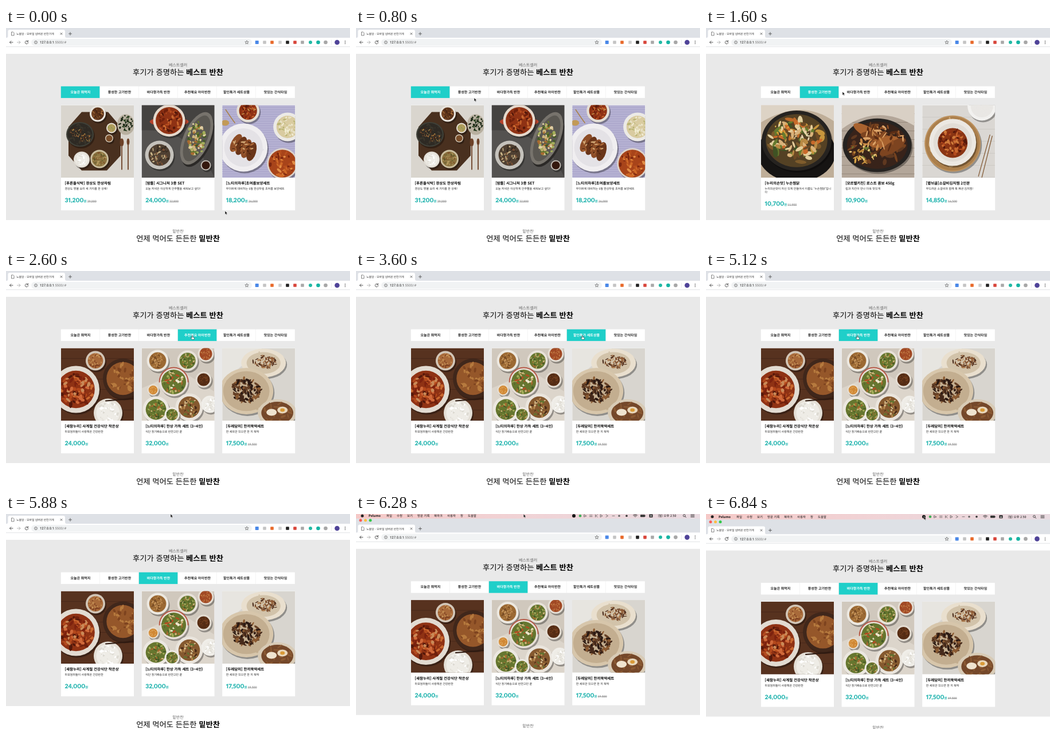
Write an HTML page that moves like this. It is 600x375 px and loops after 6880 ms.

```html
<!DOCTYPE html>
<html lang="ko">
<head>
<meta charset="utf-8">
<title>반찬가게</title>
<style>
html, body { margin: 0; width: 100%; height: 100%; overflow: hidden; background: #fff; }
svg { display: block; width: 600px; height: 375px; text-rendering: geometricPrecision; font-family: "Noto Sans CJK KR", "Noto Sans CJK", sans-serif; }
.price { font: 900 10.4px Lato, sans-serif; font-variant-numeric: proportional-nums; fill: #25b5b0; }
.won { font: 700 5.4px "Noto Sans CJK KR", sans-serif; }
.old { font: 400 5.1px Lato, sans-serif; fill: #666; text-decoration: line-through; }
</style>
</head>
<body>
<svg id="stage" viewBox="0 0 600 375"></svg>
<script>
const LOOP = 6880;
let seed = 7;
const rnd = () => (seed = (seed * 16807) % 2147483647) / 2147483647;

// Drawing helpers, all returning SVG markup
const rect = (x, y, w, h, fill, r = 0) => `<rect x="${x}" y="${y}" width="${w}" height="${h}" rx="${r}" fill="${fill}"/>`;
const oval = (x, y, rx, ry, fill, turn = 0) =>
  `<ellipse rx="${rx.toFixed(1)}" ry="${ry.toFixed(1)}" fill="${fill}" transform="translate(${x.toFixed(1)} ${y.toFixed(1)}) rotate(${turn | 0})"/>`;
const dot = (x, y, r, fill) => oval(x, y, r, r, fill);
const line = (d, color, w = 1) => `<path d="${d}" fill="none" stroke="${color}" stroke-width="${w}" stroke-linecap="round"/>`;
const shape = (d, fill) => `<path d="${d}" fill="${fill}"/>`;
const text = (x, y, s, size, fill = '#222', weight = 400, more = '') =>
  `<text x="${x}" y="${y}" font-size="${size}" fill="${fill}" font-weight="${weight}" ${more}>${s}</text>`;
const mid = 'text-anchor="middle"';

// Scattered pieces of food in an ellipse
function food(x, y, rx, ry, colors, n = 56) {
  const c = colors.split(' ');
  let s = '';
  for (let i = 0; i < n; i++) {
    const a = rnd() * 6.283, d = Math.sqrt(rnd()) * .88;
    s += oval(x + Math.cos(a) * d * rx, y + Math.sin(a) * d * ry, rx * (.07 + .13 * rnd()), ry * (.04 + .06 * rnd()), c[i % c.length], rnd() * 180);
  }
  return s;
}
function dish(x, y, r, rim, colors, fill = .78, k = 1) {
  const q = r * fill;
  return oval(x + 2, y + 3, r, r * k, '#0005') + oval(x, y, r, r * k, rim) +
    oval(x, y, q, q * k, colors.split(' ')[0]) + food(x, y, q, q * k, colors);
}
const planks = (color, step) => {
  let s = '';
  for (let y = step; y < 127; y += step) s += line(`M0 ${y}H127`, color, .6);
  return s;
};
const RED = '#8f3214 #b24a1e #6f200c #c9682f #55180a';
const BROWN = '#5c331a #85502a #3f2314 #a9713c';
const RICE = '#eeece6 #fff #dedbd3';
const GREEN = '#66762f #a3ad5a #cdb47c #435a26 #a86b30';

const photos = [
  [
    rect(0, 0, 127, 127, '#d9d5ce') +
      shape('M36 12H82L104 38V88L80 114H36L13 88V38Z', '#49301f') +
      dish(64, 15, 14, '#e9e5de', BROWN) + dish(33, 51, 24, '#3f4038', '#2e2a24 #3a352b', .9, .9) +
      food(26, 48, 13, 9, BROWN + ' #b9954e', 30) + food(42, 58, 12, 9, BROWN + ' #b9954e', 30) +
      dish(88, 40, 9, '#e6e1d6', '#b69d60 #8a9a50') + dish(84, 58, 7, '#d5cab8', '#7b4e2a') +
      dish(67, 94, 16, '#cbbf9f', '#8c7440 #b79d62 #5e5a2c #7b4c24', .82) +
      dish(36, 95, 14, '#e4e0d8', RICE) + oval(113, 34, 15, 18, '#b8b0a0') + food(113, 33, 14, 17, '#1c2a17 #2f4724 #16220f', 44) +
      line('M106 68V112M117 62V112', '#6d4128', 1.8) + oval(106, 65, 3.4, 7, '#6d4128') + oval(117, 64, 2.4, 6, '#6d4128'),
    rect(0, 0, 127, 127, '#545250') + shape('M0 0H127V127Q90 40 0 44Z', '#444240') +
      oval(48, 29, 34, 8, '#b5432c') + dish(48, 27, 28, '#e6d9cc', RED, .84) +
      oval(98, 62, 23, 49, '#2b2927', 24) + oval(96, 58, 23, 49, '#77736c', 24) + oval(96, 58, 18, 43, '#5b5852', 24) +
      food(95, 58, 17, 34, GREEN + ' #e0cfa4', 90) +
      dish(31, 87, 25, '#c5c2bc', '#4f4032 #382b20 #99805a #c9b488 #7a5034', .76) + dish(112, 105, 9, '#c0bbb3', '#35190e'),
    rect(0, 0, 127, 127, '#b5b1d2') + planks('#a29dc6', 4) +
      line('M6 8Q18 26 22 31', '#a9824a', 1.6) + oval(5, 31, 7, 5, '#c29a57') +
      dish(45, 10, 20, '#e5dfd5', RED + ' #c79a4e') + dish(114, 38, 25, '#eceae6', '#d9cba0 #f0ebcf #b9b473 #e6dfc4') +
      dish(37, 74, 42, '#f0eef0', '#e4e2e6', .8) +
      [0, 1, 2, 3].map(i => oval(24 + i * 9, 66 + i * 5, 8, 17, i % 2 ? '#6a3519' : '#8d4d27', 28 - i * 4)).join('') +
      food(37, 73, 23, 16, '#4a2210 #a96636 #d0a572', 26) +
      dish(105, 102, 27, '#ddd4cc', '#a8441a #d06a28 #7c260e #e28d45 #b8501e', .9)
  ],
  [
    rect(0, 0, 127, 127, '#bfae98') + shape('M0 0H127V28Q70 -12 0 30Z', '#ddd3c5') +
      oval(62, 82, 68, 52, '#161413') + dish(62, 62, 61, '#262320', '#544124 #c7953c #66772f #bd6a2a #e2cf9e #7f5c2c #3f5224', .88, .86) +
      food(62, 58, 44, 36, '#e5cd9a #b98a44 #d9b27a #667a2e #c96a2a #6d4a24', 60) +
      food(36, 42, 15, 13, '#dda233 #e9be4f', 14) + food(72, 48, 20, 16, '#ead8b4 #d8bb8c', 16),
    rect(0, 0, 127, 127, '#b3a699') + planks('#85776b', 15) + shape('M0 0H127V36Q60 -4 0 42Z', '#d9d0c5') +
      dish(62, 70, 60, '#262321', '#38231a #5f3820 #75421f', .88, .78) +
      food(38, 84, 28, 20, '#d9a64a #b98436 #ecc97c #6d7a34 #e0b868', 34) +
      [0, 1, 2, 3].map(i => oval(44 + i * 15, 46 + i * 9, 26, 9, i % 2 ? '#7d4420' : '#a8622f', 28 - i * 20)).join('') +
      food(70, 58, 42, 24, '#c98848 #5a2c14 #8e4e24 #dca368', 44),
    rect(0, 0, 127, 127, '#dad7d3') + planks('#c5c1bc', 21) +
      dish(104, 2, 25, '#f2f1ef', '#e9e7e4') + dish(53, 67, 49, '#bd925f', '#ab7f4c #cda571', .96) +
      dish(53, 65, 41, '#ece8e2', '#e2ddd6', .82) + dot(53, 66, 26, '#8a3514') + food(53, 65, 27, 25, RED + ' #cf7a3a', 84) +
      line('M118 52L98 124M122 54L104 126', '#8a6543', 1.4)
  ],
  [
    rect(0, 0, 127, 127, '#57321f') + planks('#3f2318', 18) +
      dish(60, 22, 17, '#d2c6b7', '#a86a3a #7c3f20 #cb9a5c') + dish(108, 53, 35, '#40271b', '#95572a #b67a3e #7d431f', .82) +
      dish(26, 72, 41, '#e2dbd1', RED, .8) + food(26, 70, 29, 29, '#b4481c #d0693a #7d220e #c98a58', 50) +
      dish(82, 113, 25, '#e4dfd6', RICE, .82) + line('M78 92L127 88', '#2e1a11', 2),
    rect(0, 0, 127, 127, '#d0c8bd') + shape('M0 70L70 40L127 76V127H0Z', '#dcd5cb') +
      dish(28, 22, 19, '#ece8e0', '#9c6a34 #c4935a #714622') + dish(80, 22, 18, '#e8e2d9', GREEN) +
      dish(112, 10, 14, '#e4ddd3', '#a04824 #c27a44') + dish(56, 59, 25, '#e8dfd7', GREEN + ' #b84a22 #f0e6cc', .86) +
      line('M31 59A25 25 0 0 1 81 59', '#b65a48', 2) + dish(108, 55, 14, '#e4ddd3', '#552c14 #75401f') +
      dish(20, 73, 10, '#e8e0d4', '#d08835 #dfa55a') + dish(25, 107, 23, '#ece8e1', GREEN) +
      dish(83, 103, 24, '#eae5dd', '#85592f #b98c52 #5f7430 #4c2c18 #d8bd8c') + dish(53, 116, 13, '#eeeae3', GREEN) +
      dish(119, 98, 15, '#f0eee9', RICE),
    rect(0, 0, 127, 127, '#d8d5cf') + shape('M0 0H70L0 60Z', '#e7e5e0') +
      dish(72, 26, 39, '#e9dfce', '#d2c3aa', .76, .64) + food(74, 24, 24, 13, '#6a4128 #8c5a36 #4b2c1c #a9784c', 56) +
      dish(42, 75, 47, '#d7c6ab', '#c3ae90', .86, .86) + food(41, 73, 29, 24, '#2c1b14 #45291a #643f25 #8b5a31', 100) +
      dish(96, 113, 34, '#d8cbb6', '#75482a #8b5a33', .82, .7) + oval(86, 112, 9, 6, '#efe3cf') + oval(105, 108, 9, 6, '#e9d8bc') +
      oval(105, 108, 4, 3, '#d99a38')
  ],
  [
    rect(0, 0, 127, 127, '#dedad0') + shape('M0 0H60L0 68Z', '#b7bd9a') + oval(66, 114, 56, 14, '#bdb5a8') +
      line('M103 62Q126 60 120 82Q115 96 97 92', '#6f8b97', 7) +
      shape('M14 56Q14 119 60 120Q106 119 106 56Z', '#7f9ba6') + shape('M20 94Q29 119 60 120Q91 119 100 94Z', '#d4cabb') +
      dish(60, 54, 46, '#a9bcc3', '#8a3a1c #b94f2a #d59a48 #c56c2e #dcbc7c', .86, .7) +
      food(70, 47, 25, 16, '#44642a #6a8c40 #2b461b #c84a27', 44),
    rect(0, 0, 127, 127, '#744629') + planks('#5a341e', 19) +
      oval(76, 6, 18, 12, '#d9a45c') + oval(76, 4, 13, 8, '#edcd94') + line('M108 22L126 48', '#b69371', 2) + oval(105, 17, 5, 8, '#b69371', -30) +
      dish(56, 73, 48, '#f1eeea', '#e5e1dc', .82) + dot(56, 72, 33, '#8f3017') + food(56, 72, 34, 33, RED + ' #d08048', 110),
    rect(0, 0, 127, 127, '#dcdbd8') + oval(114, 76, 20, 13, '#efeeeb') +
      dish(64, 64, 59, '#f5f4f1', '#e9e8e4', .8) +
      oval(68, 70, 38, 36, '#9a5e28') + food(68, 68, 36, 34, '#b07034 #8a5022 #c08848 #cf9d5c', 60) +
      oval(72, 58, 26, 13, '#b97c3c', 24) + food(24, 72, 14, 18, '#4b6a2d #6f8e43 #513047 #2d4821', 44)
  ]
];

// title, description, price, previous price; "|" breaks a line
const meals = [
  [['[푸른들식탁] 경상도 한상차림', '경상도 명물 요리 세 가지를 한 상에!', '31,200', '39,000'],
   ['[밤톨] 시그니처 3종 SET', '오늘 저녁은 이상하게 안주빨을 세워보고 싶다!', '24,000', '32,800'],
   ['[느티의하루]초여름보양세트', '무더위에 대비하는 6월 한상차림 초여름 보양세트', '18,200', '26,000']],
  [['[누리의손맛] 누손찜닭', "누리의손맛이 자신 있게 만들어서 이름도 '누손찜닭'입니|다", '10,700', '11,900'],
   ['[모르벨키친] 로스트 콤보 450g', '립과 치킨이 만나 더욱 맛있게', '10,900'],
   ['[볕뉘골]소갈비김치찜 2인분', '부드러운 소갈비와 함께 푹 쪄낸 김치찜!', '14,850', '16,500']],
  [['[새참누리] 사계절 건강식단 작은상', '마포엄마들이 사랑해온 건강반찬', '24,000'],
   ['[느티의하루] 한상 가득 세트 (3~4인)', '식단 정기배송으로 반찬고민 끝', '32,000'],
   ['[두레담미] 한끼뚝딱세트', '한 세트만 있으면 한 끼 뚝딱', '17,500', '19,500']],
  [['[꼬마별의밥동무] 입맛감각 살려주는 유부|토마토조림 200g', '아이반찬과 다이어트 반찬으로 일석이조!', '4,900'],
   ['[새참누리] 수제미트볼조림 300g', '재료부터 다른 수제미트볼조림', '8,700'],
   ['[Dawny482] 흰살생선 된장소스구이|200g', '부드러운 명태살을 이용한 특별한 생선요리', '9,000']]
];
const tabs = ['오늘은 뭐먹지', '풍성한 고기반찬', '바다향가득 반찬', '추천해요 아이반찬', '할인특가 세트상품', '맛있는 간식타임'];
const mealOf = [0, 1, 2, 2, 2, 3];

function card([title, desc, price, old], i, art) {
  const x = 96 + i * 140.6, tx = x + 6.6;
  let y = 273.4;
  let s = rect(x, 134.5, 127, 183.5, '#fff') +
    `<svg x="${x}" y="134.5" width="127" height="126.5" viewBox="0 0 127 126.5">${art}</svg>`;
  title.split('|').forEach((row, n) => { y += n * 7; s += text(tx, y, row, 6.5, '#000', 700); });
  y += 9;
  desc.split('|').forEach((row, n) => { y += n * 6; s += text(tx, y, row, 5, '#222'); });
  y += 22;
  return s + `<text class="price" x="${tx}" y="${y}">${price}<tspan class="won">원</tspan>` +
    (old ? `<tspan class="old" dx="1.2">${old}</tspan>` : '') + '</text>';
}

const heading = (y, small, light, bold) => text(300, y, small, 7, '#666', 400, mid) +
  text(300, y + 15, `${light} <tspan font-weight="700">${bold}</tspan>`, 13.3, '#000', 400, mid);

function browser() {
  const icons = [[451, '#c4c4c4'], [464, '#e86a2b'], [478, '#cfcfcf'], [491, '#222'], [504, '#d8453b'], [517, '#a9a9a9']];
  return rect(0, -20, 600, 37, '#dee1e6') +
    ['#fc5b57', '#fdbc40', '#34c84a'].map((c, i) => dot(8 + i * 8.5, -4.7, 2.5, c)).join('') +
    shape('M1 17Q3.5 17 3.5 14V6Q3.5 3 6.5 3H100Q103 3 103 6V14Q103 17 106 17Z', '#fff') +
    '<path d="M9.5 7H12.5L14 8.5V13H9.5Z" fill="none" stroke="#555" stroke-width=".7"/>' +
    text(18, 12, '노을담 - 모바일 넘버원 반찬가게', 4.9, '#333') +
    line('M95 8.5L98 11.5M98 8.5L95 11.5M109.5 10H114.5M112 7.5V12.5', '#444', .8) +
    rect(0, 17, 600, 28, '#fff') + rect(0, 32.4, 600, .7, '#d6d8db') + rect(44, 19, 385, 12, '#f1f3f4', 6) +
    line('M12 25H6.5M9 22.5L6.5 25L9 27.5M38.2 23.5A2.7 2.7 0 1 0 38.7 25.5M38.5 21.8V23.8H36.5', '#444', .9) +
    line('M19.5 25H25M22.5 22.5L25 25L22.5 27.5', '#aaa', .9) +
    '<circle cx="52" cy="25" r="2.5" fill="none" stroke="#555" stroke-width=".7"/>' + line('M52 24.8V26.2M52 23.6V23.7', '#555', .6) +
    text(59, 27.2, '127.0.0.1<tspan fill="#777">:5500/#</tspan>', 6, '#111', 400, 'font-family="Roboto, sans-serif"') +
    '<path d="M420 21.8L420.9 24H423.2L421.4 25.5L422 27.8L420 26.5L418 27.8L418.6 25.5L416.8 24H419.1Z" fill="none" stroke="#444" stroke-width=".6"/>' +
    rect(434.7, 22, 6, 6, '#4a88e8', .8) + icons.map(([x, c]) => rect(x - 2.8, 22.2, 5.6, 5.6, c, .8)).join('') +
    dot(531, 25, 3, '#20b8a4') + dot(544.5, 25, 3.3, '#16b3a3') + dot(557.5, 25, 3.3, '#a7a7a7') +
    line('M567.5 21V29', '#ddd', .6) + dot(577.5, 25, 4.3, '#4f4398') +
    [22.7, 25, 27.3].map(y => dot(591.5, y, .7, '#444')).join('');
}

function menuBar() {
  const items = [[53, '파일'], [71, '수정'], [89, '보기'], [107, '방문 기록'], [136, '북마크'], [159, '사용자'], [182, '창'], [195, '도움말']];
  return rect(0, -1, 600, 10.5, 'url(#menuTint)') + dot(11, 4.8, 2.5, '#222') +
    text(22, 6.8, 'Pelumo', 5.6, '#111', 700) + items.map(([x, s]) => text(x, 6.8, s, 5.4, '#111', 500)).join('') +
    dot(380, 4.8, 3, '#151515') + dot(391, 4.8, 2.3, '#3fae55') +
    line('M398 3L402 5L398 6.5ZM407.5 3.6H412M407.5 6H412M417.5 2.8V6.8M421 2.8L418.5 4.8L421 6.8M426.5 2.8L430 4.8L426.5 6.8ZM436 2.8L439.5 4.8L436 6.8M447 4.8H451', '#444', .7) +
    dot(459, 4.8, 1.8, '#666') + dot(472, 4.8, 1.8, '#333') +
    line('M483.5 3.6Q487 .9 490.5 3.6M485 5.2Q487 3.7 489 5.2M487 6.8V6.9', '#222', .9) +
    rect(496, 2.8, 8, 4, '#333', .8) + rect(504.4, 4, .8, 1.6, '#333') +
    rect(511.5, 2, 6, 5.6, '#222', .8) + text(514.5, 6.6, 'A', 4.8, '#fff', 700, mid) +
    text(526.5, 6.8, '(월) 오후 2:50', 5.4, '#111', 500) +
    '<circle cx="572.5" cy="4.3" r="1.9" fill="none" stroke="#222" stroke-width=".8"/>' + line('M574 5.8L575.6 7.4', '#222', .9) +
    line('M584 2.8H590M584 4.8H590M584 6.8H590', '#222', .8);
}

const stage = document.getElementById('stage');
stage.innerHTML = `<defs><linearGradient id="menuTint"><stop stop-color="#f5c9c7"/><stop offset=".5" stop-color="#f0d3d6"/><stop offset="1" stop-color="#e9dbe1"/></linearGradient></defs>
  <g id="page">${rect(0, 33, 600, 360, '#fff')}${rect(0, 45, 600, 290, '#e9e9e9')}
    ${heading(67, '베스트셀러', '후기가 증명하는', '베스트 반찬')}${heading(356.8, '밑반찬', '언제 먹어도 든든한', '밑반찬')}
    ${tabs.map((s, i) => `<g class="tab">${rect(95.8 + i * 68, 101.7, i < 5 ? 67.6 : 68, 20.4, '#fff')}${text(130 + i * 68, 113.8, s, 6, '#222', 600, mid)}</g>`).join('')}
    ${meals.map((set, n) => `<g class="meals">${set.map((m, i) => card(m, i, photos[n][i])).join('')}</g>`).join('')}
    ${browser()}</g>
  <g id="menu">${menuBar()}</g>
  <path id="arrow" d="M0 0V6.2L1.5 4.9L2.5 7.1L3.5 6.7L2.6 4.5H4.5Z" fill="#111" stroke="#fff" stroke-width=".5"/>
  <path id="hand" d="M-.8 0Q0 -.9 .8 0V2.4L2.8 2.9Q3.6 3.2 3.4 4.3L2.9 6.4H-.6L-2.6 3.8Q-2.6 2.8 -1.6 3.1L-.8 3.7Z" fill="#fff" stroke="#222" stroke-width=".6"/>`;

const pick = s => document.querySelector(s);
const tabNodes = document.querySelectorAll('.tab'), mealNodes = document.querySelectorAll('.meals');
const clicks = [[0, 0], [1000, 1], [2240, 2], [2540, 3], [3400, 4], [4120, 5], [5000, 2]];
const path = [[0, 382, 319], [160, 382, 319], [880, 200, 115], [1280, 200, 113], [1600, 238, 111], [1920, 264, 113], [2260, 266, 113],
  [2500, 325, 113], [2800, 325, 113], [3280, 395, 113], [3680, 395, 113], [4000, 466, 113], [4180, 466, 113], [4400, 293, 124],
  [4720, 264, 114], [5120, 264, 113], [5740, 285, 18], [5880, 287, 0], [6240, 290, 0], [6680, 380, 4], [LOOP, 380, 4]];
const ease = u => (u = Math.max(0, Math.min(1, u)), u * u * (3 - 2 * u));

function cursorAt(t) {
  const i = path.findIndex(p => p[0] > t), [t0, x0, y0] = path[i - 1], [t1, x1, y1] = path[i];
  const u = ease((t - t0) / (t1 - t0));
  return [x0 + (x1 - x0) * u, y0 + (y1 - y0) * u];
}

function draw(t) {
  const active = clicks.filter(c => c[0] <= t).pop()[1];
  tabNodes.forEach((g, i) => {
    g.firstChild.setAttribute('fill', i === active ? '#1fcfc9' : '#fff');
    g.lastChild.setAttribute('fill', i === active ? '#fff' : '#222');
  });
  mealNodes.forEach((g, i) => g.style.display = i === mealOf[active] ? '' : 'none');

  const drop = ease((t - 6040) / 320);
  pick('#page').setAttribute('transform', `translate(0 ${18.4 * drop})`);
  pick('#menu').setAttribute('transform', `translate(0 ${10 * (drop - 1)})`);

  const [x, y] = cursorAt(t);
  const onLabel = y > 105 && y < 119 && x > 96 && x < 504 && Math.abs((x - 96) % 68 - 34) < 24;
  for (const [id, shown] of [['#arrow', !onLabel], ['#hand', onLabel]]) {
    pick(id).setAttribute('transform', `translate(${x} ${y})`);
    pick(id).style.display = shown ? '' : 'none';
  }
}

const start = performance.now();
function tick() {
  draw((performance.now() - start) % LOOP);
  requestAnimationFrame(tick);
}
tick();
</script>
</body>
</html>
```
